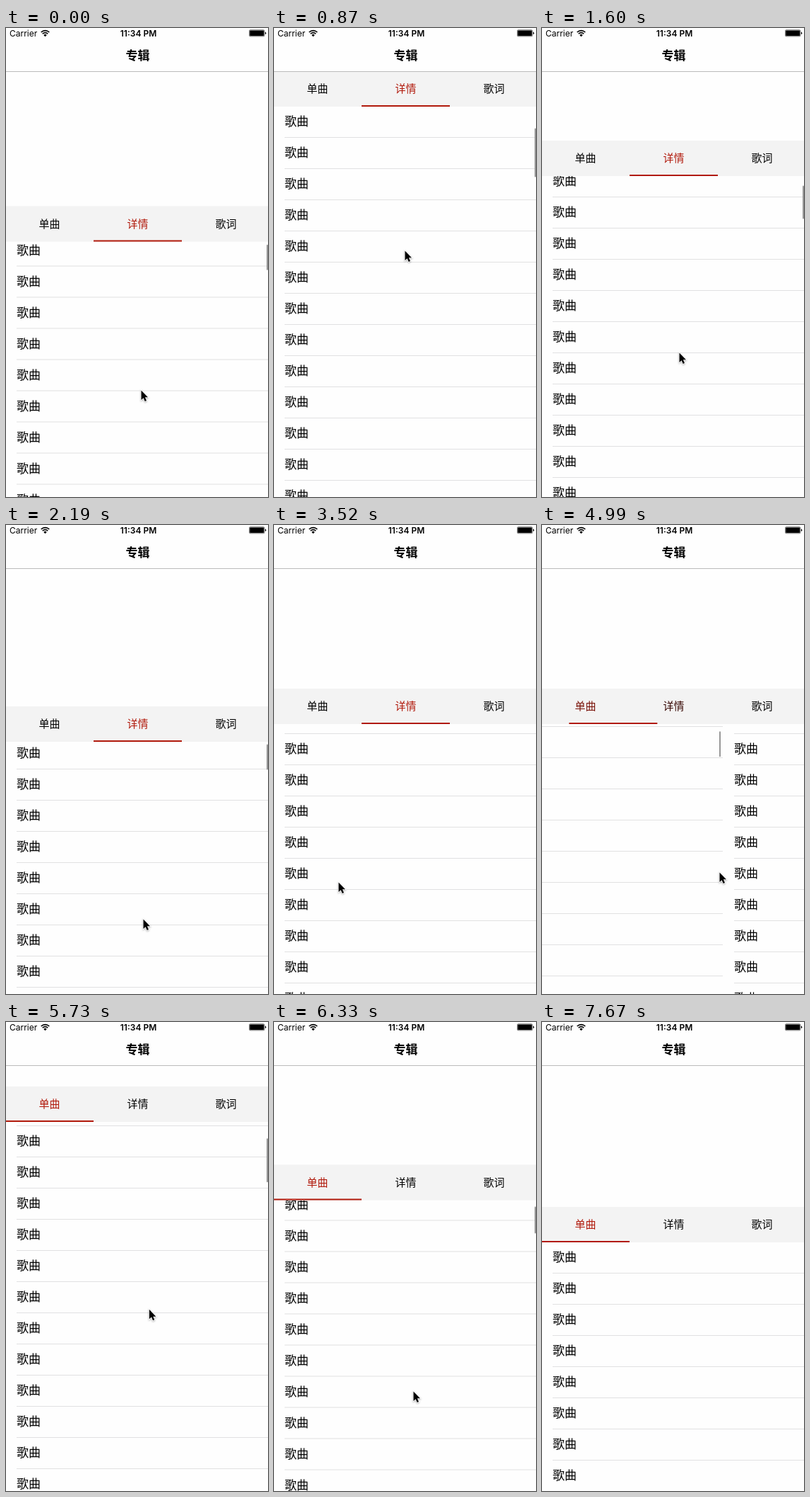
An HTML page for the animation above (8.12 s loop, 371x662 px).

```html
<!DOCTYPE html>
<html lang="zh-CN">
<head>
<meta charset="utf-8">
<style>
  html, body { margin: 0; width: 100%; height: 100%; overflow: hidden; background: #fefefe; }
  #stage { position: relative; width: 371px; height: 662px; overflow: hidden; background: #fefefe; color: #000;
    font-family: "Noto Sans CJK SC", "Noto Sans CJK", "Noto Sans CJK JP", sans-serif; }
  #stage div, #stage svg { position: absolute; }
  #phone { left: -1px; top: 0; width: 375px; height: 667px; }
  #nav { left: 0; top: 0; width: 375px; height: 61px; background: #fefefe; border-bottom: 1px solid #bcbcbc; }
  #title { left: 0; top: 18px; width: 375px; line-height: 40px; font-size: 17px; font-weight: 700; text-align: center; }
  .status { top: 0; line-height: 15px; font: 12px/15px Inter, Roboto, sans-serif; white-space: nowrap; }
  #carrier { left: 6px; }
  #clock { left: 0; width: 377px; text-align: center; font-weight: 600; }
  #tabs { left: 0; top: 0; width: 375px; height: 50px; background: #f3f3f3; }
  .tab { top: 0; width: 125px; line-height: 48px; font-size: 15px; text-align: center; }
  #mark { left: 0; top: 48px; width: 125px; height: 2px; background: #b11a0c; }
  .page { left: 0; width: 375px; bottom: 0; overflow: hidden; background: #fefefe; }
  .rows { left: 0; top: 0; width: 375px; }
  .row { left: 16px; right: 0; height: 43px; border-bottom: 1px solid #e1e1e2; line-height: 40px; font-size: 17px; }
  .bar { right: 3px; top: 0; width: 2.5px; border-radius: 1.25px; background: #989898; }
  #cursor { left: -2px; top: -2px; overflow: visible; filter: drop-shadow(0 1px 1px rgba(0, 0, 0, .3)); }
</style>
</head>
<body>
<div id="stage">
  <div id="phone">
    <div class="page" id="songs"><div class="rows"></div><div class="bar"></div></div>
    <div class="page" id="details"><div class="rows"></div><div class="bar"></div></div>
    <div id="tabs">
      <div class="tab" style="left:0">单曲</div>
      <div class="tab" style="left:125px">详情</div>
      <div class="tab" style="left:250px">歌词</div>
      <div id="mark"></div>
    </div>
    <div id="nav">
      <div class="status" id="carrier">Carrier</div>
      <div class="status" id="clock">11:34 PM</div>
      <svg style="left:50px;top:2px" width="13" height="11" viewBox="0 0 13 11" fill="none" stroke="#000" stroke-width="1.6">
        <path d="M.7 4A8.2 8.2 0 0 1 12.3 4M2.7 6.2A5.4 5.4 0 0 1 10.3 6.2"/>
        <path d="M6.5 10.2 4.3 7.9A3.1 3.1 0 0 1 8.7 7.9Z" fill="#000" stroke="none"/>
      </svg>
      <svg style="left:345px;top:2px" width="26" height="11" viewBox="0 0 26 11">
        <rect x=".4" y=".8" width="21.6" height="9" rx="1.6" fill="none" stroke="#000" stroke-width=".6"/>
        <rect x="1.2" y="1.6" width="20" height="7.4" rx=".8"/>
        <path d="M22.9 3.6Q24.3 4 24.3 5.3T22.9 7Z"/>
      </svg>
      <div id="title">专辑</div>
    </div>
  </div>
  <svg id="cursor" width="16" height="22" viewBox="-2 -2 16 22">
    <path d="M.5 .5V14L3.6 11.2 5.7 16 8 15 5.9 10.3H10Z" stroke="#fff" stroke-width="1.6" paint-order="stroke"/>
  </svg>
</div>
<script>
const LOOP = 8120, WIDTH = 375, ROW = 44, CONTENT = 100 * ROW;
const $ = id => document.getElementById(id);

// Tracks are [step, value] points
const detailsScroll = [[0, 9.5], [1, 32], [3, 130], [5, 207], [6, 220], [7, 226], [8, 214], [9, 190],
  [11, 102], [13, 34], [15, 5], [16, 5], [19, 30]];
const songsScroll = [[37, 84], [39, 170], [40, 212], [41, 218], [42, 150], [43, 59.5], [45, 59.5],
  [46, 48], [47, 34], [48, 22], [49, 12], [50, 6], [51, 2], [52, 0]];
const swipe = [[24, 0], [29, 235], [32, 247], [33, 247], [34, 257], [35, 320], [36, 358], [37, WIDTH]];
const detailsBar = [[21, 1], [23, 0]];
const songsBar = [[24, 0], [25, 1], [49, 1], [52, 0]];
const cursorX = [[0, 191], [6, 185], [11, 194], [15, 194], [19, 196], [21, 196], [24, 91], [29, 326],
  [32, 338], [33, 338], [34, 251], [37, 205], [43, 197], [45, 197], [50, 200]];
const cursorY = [[0, 511], [5, 326], [6, 314], [8, 320], [11, 458], [15, 556], [16, 556], [19, 530], [21, 530],
  [24, 504], [29, 494], [33, 492], [34, 490], [37, 492], [40, 362], [41, 358], [42, 430], [43, 521],
  [45, 521], [49, 668]];

function at(track, x) {
  const n = track.findIndex(p => p[0] > x);
  if (n === 0) return track[0][1];
  if (n < 0) return track[track.length - 1][1];
  const [x0, v0] = track[n - 1], [x1, v1] = track[n];
  return v0 + (v1 - v0) * (x - x0) / (x1 - x0);
}

// The screen refreshes in steps that slowly lengthen
const stepStart = n => 145.5 * n + 0.0385 * n * n - 8;
function stepAt(t) {
  let n = 0;
  while (stepStart(n + 1) <= t) n++;
  return n;
}

function makePage(id) {
  const page = $(id), [rows, bar] = page.children;
  for (let i = 0; i < 20; i++) {
    const row = document.createElement("div");
    row.className = "row";
    row.style.top = i * ROW + "px";
    row.textContent = "歌曲";
    rows.append(row);
  }
  return (x, top, scroll, alpha) => {
    const view = 662 - top;
    page.style.top = top + "px";
    page.style.transform = `translateX(${x}px)`;
    rows.style.transform = `translateY(${-scroll}px)`;
    bar.style.height = Math.max(36, view * view / CONTENT) + "px";
    bar.style.transform = `translateY(${3 + scroll / CONTENT * view}px)`;
    bar.style.opacity = alpha;
  };
}

const drawSongs = makePage("songs"), drawDetails = makePage("details");
const tabs = document.querySelectorAll(".tab");
const tint = k => `rgb(${177 * k}, ${26 * k}, ${12 * k})`;

function draw(t) {
  const n = stepAt(t);
  const dx = at(swipe, n), k = dx / WIDTH;
  const details = at(detailsScroll, n), songs = at(songsScroll, n);
  const top = Math.max(61, 261 - (n < 38 ? details : songs));
  drawSongs(dx - WIDTH, top + 50, songs, at(songsBar, n));
  drawDetails(dx, top + 50, details, at(detailsBar, n));
  $("tabs").style.transform = `translateY(${top}px)`;
  $("mark").style.transform = `translateX(${125 * (1 - k)}px)`;
  tabs[0].style.color = tint(k);
  tabs[1].style.color = tint(1 - k);
  $("cursor").style.transform = `translate(${at(cursorX, n)}px, ${at(cursorY, n)}px)`;
}

const begin = performance.now();
function tick() {
  draw((performance.now() - begin) % LOOP);
  requestAnimationFrame(tick);
}
tick();
</script>
</body>
</html>
```
